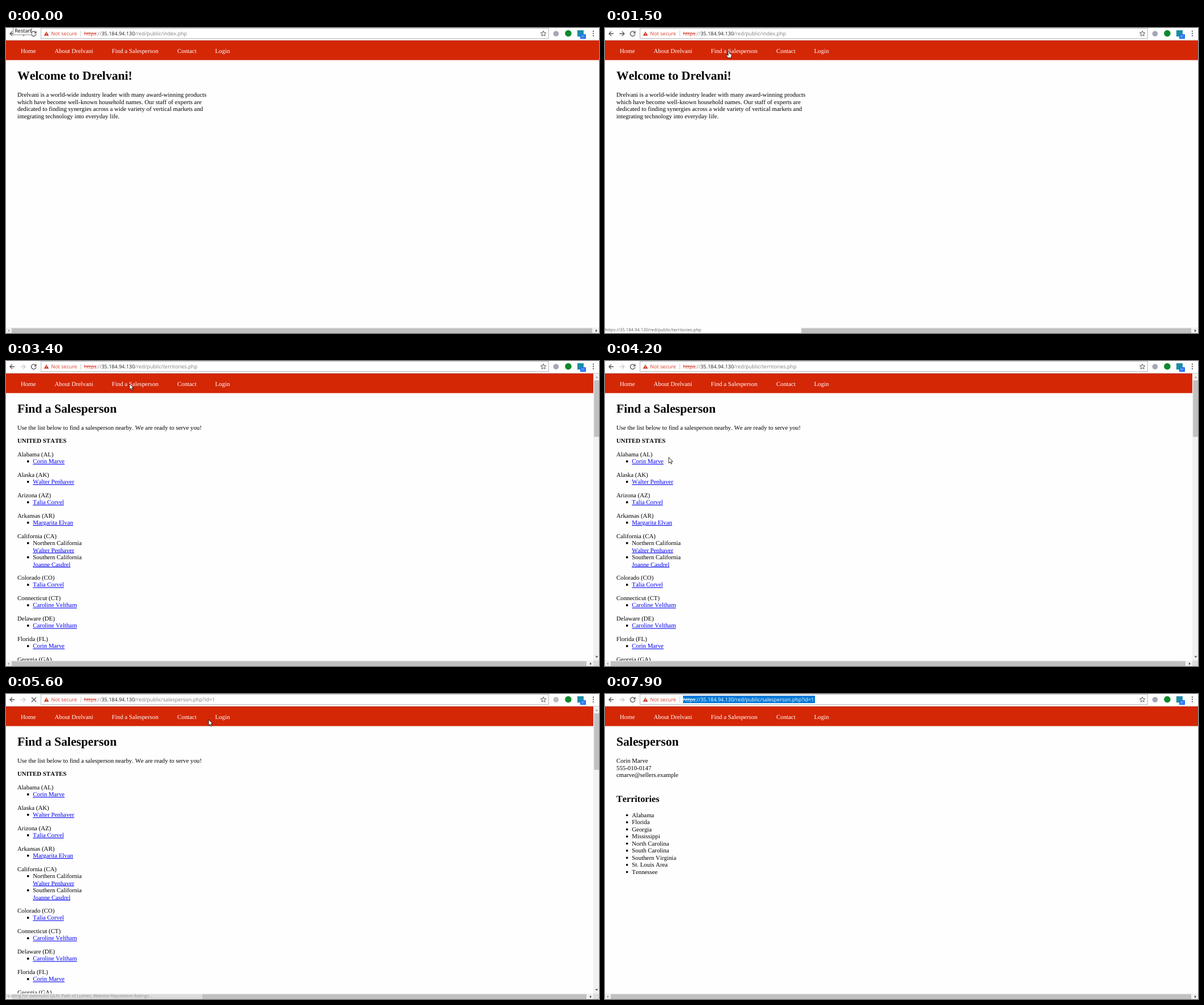
Write an HTML page that moves like this. It is 1042 px wide and 537 px high and loops after 8000 ms.

```html
<!DOCTYPE html>
<html lang="en">
<head>
<meta charset="utf-8">
<title>Browsing session</title>
<style>
  html, body { margin: 0; width: 100%; height: 100%; overflow: hidden; background: #fefefe; }
  svg { display: block; width: 1042px; height: 537px; text-rendering: geometricPrecision; font-kerning: none; }
  text { font: 10.84px "Liberation Serif", serif; font-kerning: none; fill: #000; }
  .h1 { font-size: 21.67px; font-weight: bold; }
  .h2 { font-size: 16.2px; font-weight: bold; }
  .bold { font-weight: bold; }
  .nav { fill: #fff; }
  .link { fill: #00e; text-decoration: underline; }
  .ui { font: 9px "Open Sans", sans-serif; font-kerning: none; }
  .status { font: 7.65px "Open Sans", sans-serif; fill: #606060; }
  .badge { font: 6px "Open Sans", sans-serif; fill: #fff; text-anchor: middle; }
  .warn { fill: #d93f2e; }
  .struck { text-decoration: line-through; }
  .host { fill: #222; }
  .path { fill: #7c7c7c; }
  .selected tspan { fill: #fff; }
  .icon { fill: none; stroke-width: 1.3; }
</style>
</head>
<body>
<svg id="stage" viewBox="0 0 1042 537"></svg>
<script>
const stage = document.getElementById('stage');
const HOST = '35.184.94.130', DIR = '/red/public/', LINE = 12.5;
const LINK_URL = `https://${HOST}${DIR}`;

const text = (x, y, s, cls = '') => `<text x="${x}" y="${y}" class="${cls}">${s}</text>`;
const rect = (x, y, w, h, fill, extra = '') =>
  `<rect x="${x}" y="${y}" width="${w}" height="${h}" fill="${fill}" ${extra}/>`;
const circle = (x, y, r, fill) => `<circle cx="${x}" cy="${y}" r="${r}" fill="${fill}"/>`;
const path = (d, fill, extra = '') => `<path d="${d}" fill="${fill}" ${extra}/>`;
const icon = (d, color) => `<path class="icon" d="${d}" stroke="${color}"/>`;
const lines = (x, y, rows) => rows.map((s, i) => text(x, y + i * LINE, s)).join('');

// Territory list: each state holds salespeople, optionally prefixed "Region|".
const STATES = [
  ['Alabama (AL)', 'Corin Marve'],
  ['Alaska (AK)', 'Walter Penhaver'],
  ['Arizona (AZ)', 'Talia Corvel'],
  ['Arkansas (AR)', 'Margarita Elvan'],
  ['California (CA)', 'Northern California|Walter Penhaver', 'Southern California|Joanne Casdrel'],
  ['Colorado (CO)', 'Talia Corvel'],
  ['Connecticut (CT)', 'Caroline Veltham'],
  ['Delaware (DE)', 'Caroline Veltham'],
  ['Florida (FL)', 'Corin Marve'],
  ['Georgia (GA)']
];

function territoryList() {
  let y = 167.7, out = '';
  for (const [state, ...people] of STATES) {
    out += text(20, y, state);
    for (const entry of people) {
      const parts = entry.split('|');
      out += rect(37, y + 7.4, 3.4, 3.4, '#000');
      parts.forEach((s, i) => {
        y += LINE;
        out += text(47.3, y, s, i === parts.length - 1 ? 'link' : '');
      });
    }
    y += 23.45;
  }
  return out;
}

const territories = ['Alabama', 'Florida', 'Georgia', 'Mississippi', 'North Carolina',
  'South Carolina', 'Southern Virginia', 'St. Louis Area', 'Tennessee'];

const PAGES = {
  welcome: text(20, 91, 'Welcome to Drelvani!', 'h1') + lines(20, 121, [
    'Drelvani is a world-wide industry leader with many award-winning products',
    'which have become well-known household names. Our staff of experts are',
    'dedicated to finding synergies across a wide variety of vertical markets and',
    'integrating technology into everyday life.']),
  list: text(20, 91, 'Find a Salesperson', 'h1') +
    text(20, 121, 'Use the list below to find a salesperson nearby. We are ready to serve you!') +
    text(20, 144.4, 'UNITED STATES', 'bold') + territoryList(),
  person: text(20, 91, 'Salesperson', 'h1') +
    lines(20, 121, ['Corin Marve', '555-010-0147', 'cmarve@sellers.example']) +
    text(20, 189.5, 'Territories', 'h2') + lines(47.3, 216.8, territories) +
    territories.map((_, i) => circle(38.7, 213.4 + i * LINE, 1.8, '#000')).join('')
};

const NAV = [[26, 'Home'], [85.5, 'About Drelvani'], [186, 'Find a Salesperson'],
  [301, 'Contact'], [367.5, 'Login']].map(([x, s]) => text(x, 43.7, s, 'nav')).join('');

function scrollbars(vertical) {
  const w = vertical ? 1032 : 1042;
  let out = rect(0, 527.5, w, 10, '#f1f1f1') + rect(10, 528.5, w - 22, 8.5, '#c1c1c1') +
    path('M6 530.5v5l-3-2.5z', '#a3a3a3') + path(`M${w - 6} 530.5v5l3-2.5z`, '#505050');
  if (vertical) out += rect(1032, 22, 10, 505.5, '#f1f1f1') + rect(1033.3, 34, 8.7, 99.5, '#c1c1c1') +
    path('M1035.5 30h5l-2.5-3z', '#a3a3a3') + path('M1035.5 519.5h5l-2.5 3z', '#505050') +
    rect(1032, 527.5, 10, 9.5, '#dcdcdc');
  return out;
}

function starPath(cx, cy, r) {
  return 'M' + Array.from({ length: 10 }, (_, i) => {
    const a = (i / 5 - 0.5) * Math.PI, d = i % 2 ? r * 0.45 : r;
    return (cx + d * Math.cos(a)).toFixed(2) + ' ' + (cy + d * Math.sin(a)).toFixed(2);
  }).join('L') + 'Z';
}

function toolbar(s) {
  const ink = '#555';
  return rect(0, 0, 1042, 21.3, '#fff') + rect(0, 21.3, 1042, 0.7, '#b6b4b6') +
    icon('M15 10H7M11 6L7 10L11 14', ink) +
    icon('M25.5 10H34M30 6L34 10L30 14', s.forward ? ink : '#ccc') +
    (s.busy ? icon('M45 6L53 14M53 6L45 14', ink)
      : icon('M51.6 7A4.2 4.2 0 1 0 52.9 10.8', ink) + path('M53.5 5v4.4h-4.4z', ink)) +
    rect(61.5, 0.5, 892, 18, '#fff', 'stroke="#b9b9b9"') +
    path('M71 6l4.3 7.6h-8.6z', '#d0301c') + rect(70.5, 8.5, 1, 2.4, '#fff') + rect(70.5, 11.6, 1, 1, '#fff') +
    text(79.3, 13, 'Not secure', 'ui warn') + rect(131, 5, 1, 10, '#ccc') +
    (s.selected ? rect(137, 3, 232, 13, '#0078d7') : '') +
    text(137, 13, `<tspan class="warn struck">https</tspan><tspan class="path">://</tspan>` +
      `<tspan class="host">${HOST}</tspan><tspan class="path">${DIR}${s.file}</tspan>`,
      s.selected ? 'ui selected' : 'ui') +
    (s.caret ? rect(368.5, 3, 1, 12, '#222') : '') +
    path(starPath(944.3, 10, 5), 'none', `stroke="${ink}"`) +
    circle(966.5, 10, 4.8, s.dim ? '#bdbdbd' : '#a6a6b8') +
    circle(988, 9.5, 5.7, '#0b8a2c') +
    rect(1004, 4, 11, 11, '#1b8ea6') + rect(1009, 11, 10, 8, '#1a6ff0') + text(1014, 17.2, '31', 'badge') +
    [5.7, 9.7, 13.7].map(y => circle(1032, y, 1.1, ink)).join('') +
    (s.tooltip ? rect(12.5, -2, 32.5, 14, '#fff', 'stroke="#888"') + text(15.3, 8, 'Restart', 'ui') : '');
}

const POINTERS = {
  arrow: 'M0 0V10.4L2.4 8.2L4 11.8L5.6 11.1L4.1 7.6H7.2Z',
  hand: 'M-1.2 1Q0 -.6 1.2 1V4.6L4.4 5.5Q5.2 5.8 5 8L4 12H-1.6L-4 8Q-4.2 6.4 -2.8 6.8L-1.2 8Z'
};

function render(s) {
  const vertical = s.page === 'list';
  const status = s.status ? `<g opacity="${s.fade}">${rect(0, 526, 345, 11, '#fefefe')}` +
    `${text(0, 533.7, s.status, 'status')}</g>` : '';
  const pointer = s.at ? `<g transform="translate(${s.at})">` +
    path(POINTERS[s.pointer], '#fff', 'stroke="#000" stroke-width=".8"') + '</g>' : '';
  return rect(0, 0, 1042, 537, '#fefefe') + PAGES[s.page] + rect(0, 22, 1042, 34.5, '#d42706') + NAV +
    scrollbars(vertical) + toolbar(s) + status + pointer;
}

// Each entry changes part of the state at its time in ms.
const TIMELINE = [
  [0, { page: 'welcome', file: 'index.php', forward: true, tooltip: true, fade: 1, pointer: 'arrow' }],
  [900, { tooltip: false, at: [62, 32] }],
  [1000, { at: [112, 66] }],
  [1100, { at: [158, 77] }],
  [1200, { at: [190, 68] }],
  [1300, { at: [212, 54] }],
  [1500, { at: [217.5, 40.5], pointer: 'hand', status: LINK_URL + 'territories.php' }],
  [1700, { at: [217, 40], pointer: 'arrow' }],
  [2100, { busy: true, status: `Waiting for ${HOST}...` }],
  [2500, { file: 'territories.php', forward: false, dim: true }],
  [3000, { busy: false }],
  [3200, { dim: false, status: '' }],
  [3400, { page: 'list' }],
  [3900, { at: [140.5, 183.5] }],
  [4100, { at: [122, 173] }],
  [4200, { at: [112, 169.5] }],
  [4300, { at: [99, 173], pointer: 'hand', status: LINK_URL + 'salesperson.php?id=1' }],
  [4500, { at: [97, 177.5] }],
  [4700, { busy: true, pointer: 'arrow' }],
  [5000, { file: 'salesperson.php?id=1', dim: true, status: `Waiting for ${HOST}...` }],
  [5300, { at: [146, 157.5] }],
  [5500, { at: [292, 78], status: 'Waiting for extension QLN: Path of Lumen, Website Reputation Ratings...' }],
  [5600, { at: [356, 45], fade: 0.45 }],
  [5700, { at: [366, 24], status: '' }],
  [5800, { at: [369, 8] }],
  [5900, { at: null }],
  [6000, { busy: false }],
  [6200, { page: 'person', dim: false }],
  [7600, { caret: true }],
  [7900, { caret: false, selected: true }]
];

let shown = -1;
function tick(now) {
  const t = now % 8000;
  const step = TIMELINE.findLastIndex(([time]) => time <= t);
  if (step !== shown) {
    shown = step;
    stage.innerHTML = render(Object.assign({}, ...TIMELINE.slice(0, step + 1).map(entry => entry[1])));
  }
  requestAnimationFrame(tick);
}
tick(performance.now());
</script>
</body>
</html>
```
